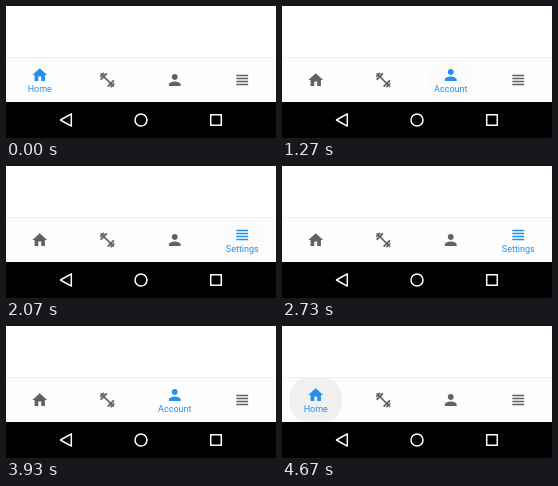
An HTML page with a canvas that plays this animation: 270 by 132 pixels, repeating every 4.74 s.

```html
<!DOCTYPE html>
<html lang="en">
<head>
<meta charset="utf-8">
<title>Bottom tabs</title>
<style>
html, body { margin: 0; width: 100%; height: 100%; overflow: hidden; background: #fff; }
canvas { display: block; width: 270px; height: 132px; }
</style>
</head>
<body>
<canvas id="stage"></canvas>
<script>
const W = 270, H = 132, LOOP = 4740;
const BAR_TOP = 52, NAV_TOP = 96, TAB_W = W / 4;
const BLUE = '#2290ec', GREY = '#616161';
const ICON_SCALE = 0.74;

const canvas = document.getElementById('stage');
const ctx = canvas.getContext('2d');
const dpr = window.devicePixelRatio || 1;
canvas.width = Math.round(W * dpr);
canvas.height = Math.round(H * dpr);

const house = new Path2D('M10 20v-6h4v6h5v-8h3L12 3 2 12h3v8z');
const person = new Path2D('M12 12c2.21 0 4-1.79 4-4s-1.79-4-4-4-4 1.79-4 4 1.79 4 4 4z' +
  'm0 2c-2.67 0-8 1.34-8 4v2h16v-2c0-2.66-5.33-4-8-4z');
const lines = new Path2D('M4 5h16v2H4zM4 9h16v2H4zM4 13h16v2H4zM4 17h16v2H4z');

const tabs = [
  { label: 'Home', icon: () => fillIcon(house) },
  { label: 'Workouts', icon: barbell },
  { label: 'Account', icon: () => fillIcon(person) },
  { label: 'Settings', icon: () => fillIcon(lines) }
];

// Which tab becomes active, and when
const taps = [
  { at: 0, tab: 0 }, { at: 400, tab: 1 }, { at: 1270, tab: 2 }, { at: 2070, tab: 3 },
  { at: 3330, tab: 1 }, { at: 3930, tab: 2 }, { at: 4670, tab: 0 }
];

const ripples = [
  { at: 1270, tab: 2, fade: 260, alpha: 0.008, r: 24 },
  { at: 2070, tab: 3, fade: 460, alpha: 0.008, r: 24 },
  { at: 3330, tab: 1, fade: 270, alpha: 0.016, r: 25 },
  { at: 4070, tab: 2, fade: 260, alpha: 0.006, r: 24 },
  { at: 4670, tab: 0, fade: 400, alpha: 0.05, r: 26.5 }
];

const tabX = i => (i + 0.5) * TAB_W;

function fillIcon(path) {
  ctx.scale(ICON_SCALE, ICON_SCALE);
  ctx.translate(-12, -12);
  ctx.fill(path);
}

function barbell() {
  ctx.rotate(Math.PI / 4);
  ctx.fillRect(-9.4, -0.75, 18.8, 1.5);
  for (const side of [-1, 1]) {
    ctx.fillRect(side * 5 - 0.95, -4.4, 1.9, 8.8);
    ctx.fillRect(side * 7.3 - 0.8, -2.7, 1.6, 5.4);
  }
}

function drawRipples(t) {
  ctx.save();
  ctx.beginPath();
  ctx.rect(0, BAR_TOP, W, NAV_TOP - BAR_TOP);
  ctx.clip();
  for (const { at, tab, fade, alpha, r } of ripples) {
    const p = (t - at) / fade;
    if (p < 0 || p >= 1) continue;
    ctx.fillStyle = `rgba(0,0,0,${alpha * (1 - p * p)})`;
    ctx.beginPath();
    ctx.arc(tabX(tab), 74, r, 0, Math.PI * 2);
    ctx.fill();
  }
  ctx.restore();
}

function drawTab(i, active) {
  const { label, icon } = tabs[i];
  ctx.fillStyle = active ? BLUE : GREY;
  ctx.save();
  ctx.translate(tabX(i), active ? 69 : 74);
  icon();
  ctx.restore();
  if (active) ctx.fillText(label, tabX(i), 86.2);
}

function drawNavKeys() {
  ctx.fillStyle = '#000';
  ctx.fillRect(0, NAV_TOP, W, H - NAV_TOP);
  ctx.strokeStyle = '#fff';
  ctx.lineWidth = 1.5;
  ctx.lineJoin = 'round';
  ctx.beginPath();
  ctx.moveTo(54.4, 114);
  ctx.lineTo(65.3, 107.9);
  ctx.lineTo(65.3, 120.1);
  ctx.closePath();
  ctx.moveTo(141, 114);
  ctx.arc(135, 114, 6, 0, Math.PI * 2);
  ctx.rect(204.7, 108.7, 10.6, 10.6);
  ctx.stroke();
}

function draw(t) {
  ctx.setTransform(dpr, 0, 0, dpr, 0, 0);
  ctx.fillStyle = '#fff';
  ctx.fillRect(0, 0, W, H);
  ctx.fillStyle = '#f0f0f0';
  ctx.fillRect(0, BAR_TOP - 1, W, 1);
  ctx.fillStyle = '#fdfdfd';
  ctx.fillRect(0, BAR_TOP, W, NAV_TOP - BAR_TOP);

  drawRipples(t);
  ctx.font = '9px Roboto, sans-serif';
  ctx.textAlign = 'center';
  const current = taps.filter(tap => tap.at <= t).pop().tab;
  tabs.forEach((_, i) => drawTab(i, i === current));
  drawNavKeys();
}

const start = performance.now();
function tick() {
  draw((performance.now() - start) % LOOP);
  requestAnimationFrame(tick);
}
tick();
</script>
</body>
</html>
```
